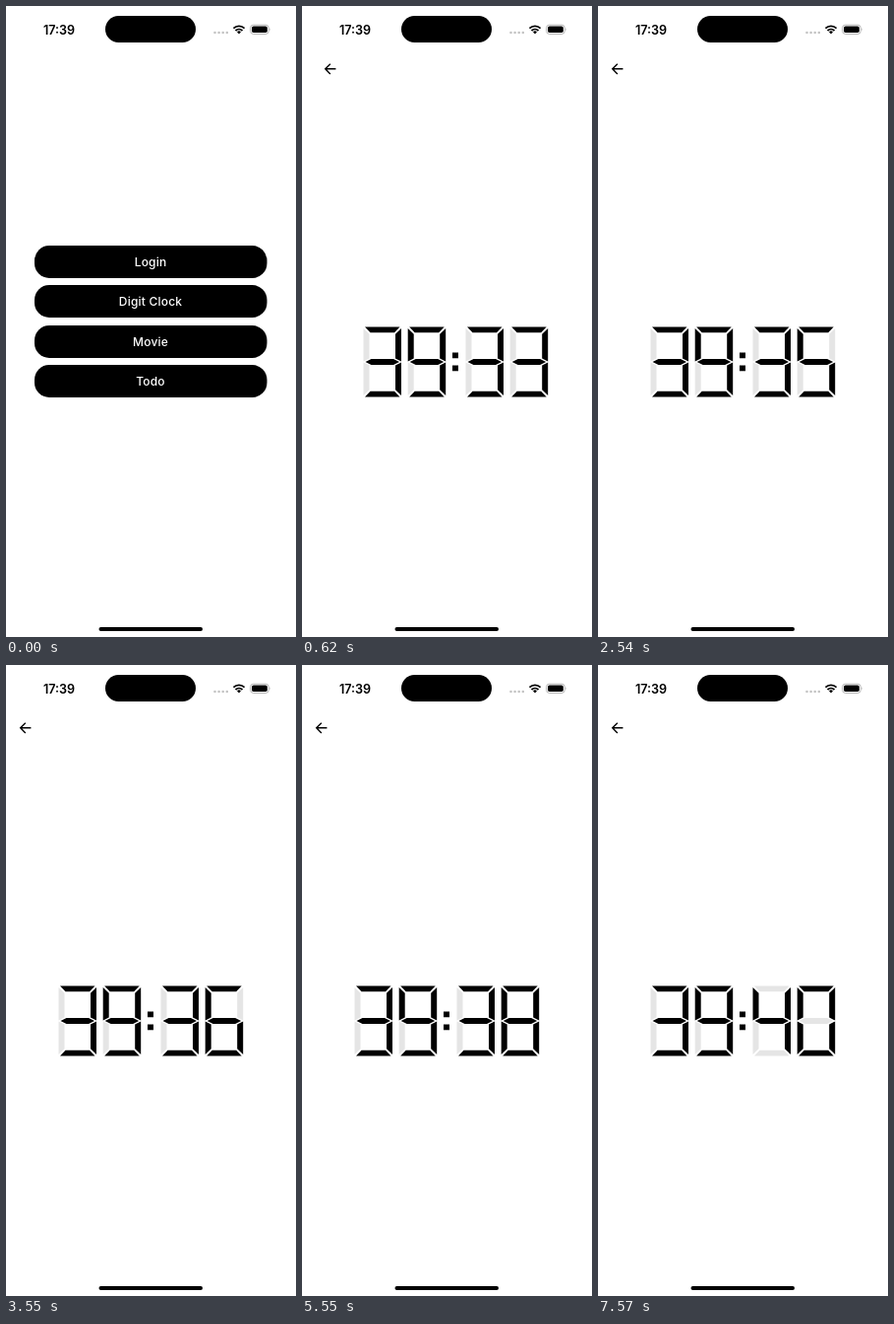
An HTML page for the animation above (8 s loop, 295x640 px).

```html
<!DOCTYPE html>
<html lang="en">
<head>
<meta charset="utf-8">
<style>
  html, body { margin: 0; width: 100%; height: 100%; overflow: hidden; background: #fff; }
  svg { display: block; width: 100vw; height: 100vh; }
  text { font-family: Inter, sans-serif; text-anchor: middle; }
  .label { font-size: 12px; font-weight: 500; letter-spacing: .2px; fill: #fff; }
  .time { font-size: 12.6px; font-weight: 600; }
  .line { fill: none; stroke: #000; stroke-width: 1.4; }
</style>
</head>
<body>
<svg viewBox="0 0 295 640">
  <defs><clipPath id="pressed"><rect x="29" y="283" width="236.5" height="33" rx="15"/></clipPath></defs>

  <text class="time" x="54" y="28.6">17:39</text>
  <rect x="101" y="10" width="92" height="27" rx="13.5"/>
  <path d="M212.5 27h13" stroke="#c4c4c4" stroke-width="2.6" stroke-linecap="round" stroke-dasharray="0 4.1" stroke-dashoffset="4.1"/>
  <path class="line" style="stroke-width:1.8" d="M231.4 22.7a8 8 0 0 1 11.2 0M233.5 25a5 5 0 0 1 7 0"/>
  <path d="M237 28.4l-2-2.1a2.9 2.9 0 0 1 4 0z"/>
  <rect x="248.6" y="19.2" width="18.6" height="9.2" rx="3" fill="#fff" stroke="#aaa" stroke-width=".9"/>
  <rect x="250" y="20.6" width="15.8" height="6.4" rx="1.8"/>
  <path d="M268.2 22.3q1.2 1.5 0 3z" fill="#aaa"/>

  <g id="menu"></g>
  <g id="clock">
    <path class="line" d="M25.4 63.8H14.8M19.8 58.7L14.7 63.8L19.8 68.9"/>
    <path d="M144 351.5h6v5.7h-6zM144 364.6h6v5.7h-6z"/>
    <g id="digits"></g>
  </g>
  <rect x="94.5" y="630" width="105.5" height="4" rx="2"/>
</svg>
<script>
const $ = id => document.getElementById(id);
const menu = $('menu'), clock = $('clock');

menu.innerHTML = ['Login', 'Digit Clock', 'Movie', 'Todo'].map((name, i) => {
  const y = Math.round(243 + 40.25 * i);
  const ripple = name === 'Digit Clock'
    ? `<g id="ripple" clip-path="url(#pressed)"><rect x="29" y="283" width="237" height="34" fill="#070807"/>
       <circle cx="165.3" cy="308" r="36" fill="#1e1e1e"/></g>` : '';
  return `<rect x="29" y="${y}" width="236.5" height="33" rx="15"/>${ripple}
    <text class="label" x="147" y="${y + 20.9}">${name}</text>`;
}).join('');

// One bar, one side and the middle; the other segments are mirror images
const W = 38.5, H = 71;
const bar = 'M1.5 0H37L31.5 5.8H7z';
const side = 'M0 1.5V35L6 32V7.3z';
const middle = 'M2 35.5L8 32.6H30.5L36.5 35.5L30.5 38.4H8z';
const segment = (shape, flipX, flipY) =>
  `<path d="${shape}" transform="translate(${flipX ? W : 0} ${flipY ? H : 0}) scale(${flipX ? -1 : 1} ${flipY ? -1 : 1})"/>`;
const digit =
  segment(bar) + segment(side, true) + segment(side, true, true) + segment(bar, false, true) +
  segment(side, false, true) + segment(side) + segment(middle);

// Segment names a to g run clockwise from the top, then the middle
const lit = ['abcdef', 'bc', 'abdeg', 'abcdg', 'bcfg', 'acdfg', 'acdefg', 'abc', 'abcdefg', 'abcdfg'];

$('digits').innerHTML = [0, 1, 2, 3].map(i =>
  `<g transform="translate(${53.5 + 45.2 * i + (i > 1 ? 13.6 : 0)} 325.5)">${digit}</g>`
).join('');
const digits = [...$('digits').children];

function draw(t) {
  const open = t >= 620;
  menu.style.display = open ? 'none' : '';
  clock.style.display = open ? '' : 'none';
  $('ripple').style.display = t >= 500 ? '' : 'none';
  clock.setAttribute('transform', `translate(${t < 720 ? 9 : 0} 0)`);

  const seconds = 33 + Math.max(0, Math.floor((t - 527.5) / 1004.5));
  [...`39${seconds}`].forEach((d, i) => {
    [...digits[i].children].forEach((seg, k) =>
      seg.setAttribute('fill', lit[d].includes('abcdefg'[k]) ? '#000' : '#e5e5e5'));
  });
}

const start = performance.now();
function frame() {
  draw((performance.now() - start) % 8000);
  requestAnimationFrame(frame);
}
frame();
</script>
</body>
</html>
```
